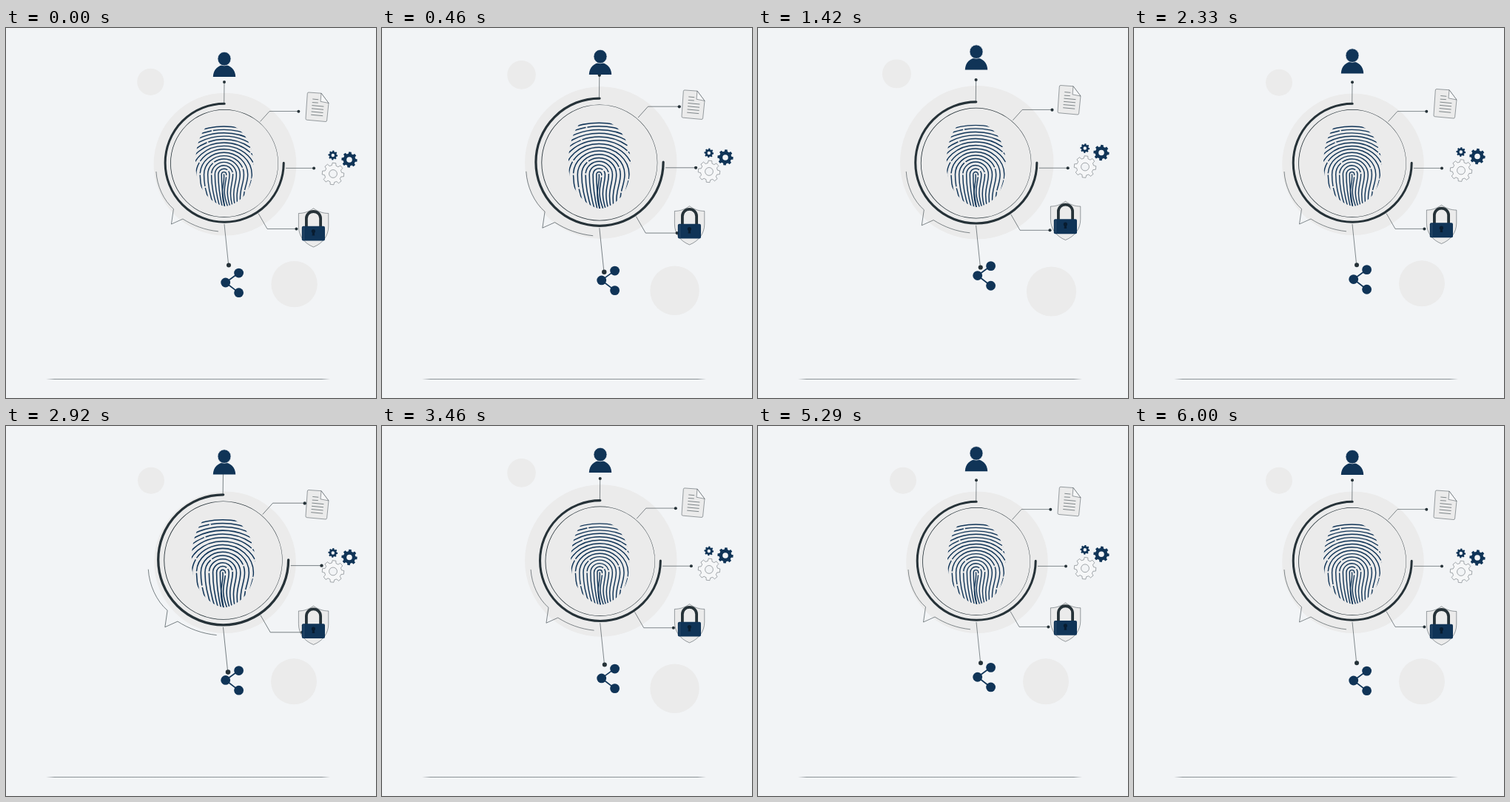
Recreate the animation shown at these times as an HTML page. Size 500 by 500 pixels, loop 6.04 s.

```html
<!DOCTYPE html>
<html lang="en">
<head>
<meta charset="utf-8">
<title>Fingerprint identity</title>
<style>
  html, body { margin: 0; width: 100%; height: 100%; overflow: hidden; background: #f2f4f6; }
  svg { display: block; width: 100vw; height: 100vh; }
  .navy { fill: #103457; }
  .dark { fill: #263238; }
  .thin { fill: none; stroke: #263238; stroke-width: .55; }
  .paper { fill: #ebebeb; stroke: #263238; stroke-width: .45; stroke-linejoin: round; }
</style>
</head>
<body>
<svg viewBox="0 0 500 500">
  <defs>
    <clipPath id="print-shape">
      <path d="M272 132H306C323 139 334 160 334.3 184C334 212 324 235 297 241C277 239 256 215 256 184C256 161 262 143 272 132Z"/>
    </clipPath>
    <linearGradient id="fade" gradientUnits="userSpaceOnUse" x1="54" x2="438" y1="0" y2="0">
      <stop offset="0" stop-color="#263238" stop-opacity="0"/>
      <stop offset=".03" stop-color="#263238"/>
      <stop offset=".97" stop-color="#263238"/>
      <stop offset="1" stop-color="#263238" stop-opacity="0"/>
    </linearGradient>
  </defs>

  <path d="M54 474.5H438V475.1H54Z" fill="url(#fade)"/>

  <g id="backdrop" fill="#ebebeb">
    <circle cx="196" cy="73.7" r="18"/>
    <circle cx="296" cy="184.3" r="95.8"/>
    <circle cx="389" cy="345.3" r="31"/>
  </g>

  <g class="float">
    <path class="paper" d="M415.5 243.7C409 248.5 402 250.5 395.4 250.5V268C395.4 281 403 291 415.5 296C428 291 435.8 281 435.8 268V250.5C429 250.5 422 248.5 415.5 243.7Z"/>
  </g>

  <g id="badge">
    <path d="M295.2 102.3A80 80 0 1 0 375.2 182.3" fill="none" stroke="#263238" stroke-width="3" stroke-linecap="round"/>
    <path class="dark" fill-rule="evenodd" d="M222.1 183a72.9 72.9 0 1 0 145.8 0a72.9 72.9 0 1 0 -145.8 0ZM222.9 183a72.3 72.3 0 1 0 144.6 0a72.3 72.3 0 1 0 -144.6 0Z"/>
    <path class="thin" d="M203 194C204 213 213 233 226.5 244.5L223.5 265L239 258C253 267 269 273 287 274.8"/>
    <path class="thin" d="M295 73L294.7 101M343.5 126.5L356 112.6H395M378 189.4H416M341 250.5L353 271.4H392M295 265L300.7 320"/>
    <g class="dark">
      <circle cx="295" cy="73.2" r="2"/>
      <circle cx="395.3" cy="112.8" r="2"/>
      <circle cx="416" cy="189.4" r="2"/>
      <circle cx="392.4" cy="271.4" r="2"/>
      <circle cx="301" cy="320.3" r="3"/>
    </g>
    <g id="print" clip-path="url(#print-shape)" fill="none" stroke="#103457" stroke-width="1.4" stroke-linecap="round"/>
  </g>

  <g class="float">
    <path class="navy" d="M279.8 66C280 56 287 50 295 50S310 56 310.2 66Z"/>
    <ellipse class="navy" cx="295" cy="41.6" rx="9" ry="9.3" stroke="#f2f4f6" stroke-width=".7"/>

    <path class="paper" d="M409 87L426 88.2L436 101.5L433.6 125Q433.4 126.7 431.6 126.5L406.5 124.2Q404.9 124 405 122.3L407.3 88.5Q407.5 87 409 87Z"/>
    <path class="paper" style="fill:#f6f7f8" d="M426 88.2L425 99.3L436 101.5Z"/>
    <path class="thin" d="M414.3 96l8 .8M413.8 100.6l8 .5M413.4 104.6l16 1.5M413 108.8l16 1.5M412.6 113l16 1.5M412.2 117.2l16 1.5"/>

    <g id="gears" fill-rule="evenodd"/>

    <path d="M405.9 270V257.3A9.6 9.3 0 0 1 425.1 257.3V270" fill="none" stroke="#263238" stroke-width="3.8"/>
    <rect class="navy" x="399.8" y="267.8" width="31.2" height="19.8" rx="2"/>
    <path d="M402.6 269V286.5" stroke="#48637d" stroke-width=".6"/>
    <path d="M414.2 275h2.4l.6 5.5h-3.6Z" fill="#081c30"/>
    <circle cx="415.4" cy="274.6" r="2.6" fill="#081c30"/>

    <path d="M314.5 331L296.7 344L314.5 357.7" fill="none" stroke="#103457" stroke-width="1.7"/>
    <g class="navy">
      <circle cx="314.6" cy="331.1" r="6.4"/>
      <circle cx="296.7" cy="344" r="6.4"/>
      <circle cx="314.6" cy="357.7" r="6.4"/>
    </g>
  </g>
</svg>
<script>
  const LOOP = 6040;
  const $ = id => document.getElementById(id);
  const floaters = document.querySelectorAll('.float');

  function addPath(parent, d, attrs = {}) {
    const path = document.createElementNS('http://www.w3.org/2000/svg', 'path');
    path.setAttribute('d', d);
    for (const key in attrs) path.setAttribute(key, attrs[key]);
    parent.append(path);
  }

  // Ridges flatten towards the top; left legs lean inwards, right legs sway.
  function drawPrint() {
    const cx = 294.5, cy = 198;
    for (let i = 0; i < 15; i++) {
      const ry = 3.4 + 4.4 * i, rx = ry * (.95 + .022 * i);
      const left = cx - rx, right = cx + rx, sway = Math.max(0, 7 - i * .7);
      addPath($('print'),
        `M${cx - rx * .74 + 4} 244Q${left} 220 ${left} ${cy}` +
        `A${rx} ${ry} 0 0 1 ${right} ${cy}` +
        `C${right} ${cy + 14} ${cx + rx * .85 - sway} ${cy + 20} ${cx + rx * .7 + 4} 244`,
        { 'stroke-dasharray': `${57 + i * 37 % 41} 3.2 ${83 + i * 29 % 47} 3`, 'stroke-dashoffset': i * 31 % 53 });
    }
    addPath($('print'), 'M294.5 198C296 212 288 218 296 243');
  }

  function gear(cx, cy, outer, hole, attrs) {
    const teeth = 8, inner = outer * .78, points = [];
    for (let i = 0; i < teeth; i++) {
      for (const [offset, r] of [[-.32, inner], [-.2, outer], [.2, outer], [.32, inner]]) {
        const a = (i + offset) / teeth * 2 * Math.PI + .1;
        points.push(`${cx + r * Math.cos(a)} ${cy + r * Math.sin(a)}`);
      }
    }
    const ring = `M${cx - hole} ${cy}a${hole} ${hole} 0 1 0 ${2 * hole} 0a${hole} ${hole} 0 1 0 ${-2 * hole} 0Z`;
    addPath($('gears'), `M${points.join('L')}Z${ring}`, attrs);
  }

  const smooth = u => (1 - Math.cos(Math.PI * Math.min(1, Math.max(0, u)))) / 2;
  const beat = (t, start, peak, end) =>
    t < peak ? smooth((t - start) / (peak - start)) : smooth((end - t) / (end - peak));
  const swell = (t, length) => t < length ? Math.sin(Math.PI * t / length) : 0;

  function scaleAbout(node, x, y, s) {
    node.setAttribute('transform', `translate(${x} ${y}) scale(${s}) translate(${-x} ${-y})`);
  }

  function render(time) {
    const t = time % LOOP;
    const phase = (t + 40) % LOOP;

    const half = Math.min(t, 6000) % 3000 / 1500;
    const lift = 10 * (half < 1 ? half : 2 - half);
    floaters.forEach(g => g.setAttribute('transform', `translate(0 ${-lift})`));

    scaleAbout($('backdrop'), 299, 216, 1 + .105 * swell(phase % 3000, 2060));
    const pulse = beat(phase, 0, 740, 1830) + beat(phase, 2370, 2930, 3720);
    scaleAbout($('badge'), 310.5, 197, 1 + .1 * pulse);
  }

  drawPrint();
  gear(441.8, 172, 6.4, 2.2, { class: 'navy' });
  gear(464, 178, 10.7, 3.8, { class: 'navy' });
  gear(442, 197, 14.8, 5.4, { fill: '#f6f7f8', stroke: '#263238', 'stroke-width': .4 });

  const began = performance.now();
  function tick() {
    render(performance.now() - began);
    requestAnimationFrame(tick);
  }
  tick();
</script>
</body>
</html>
```
